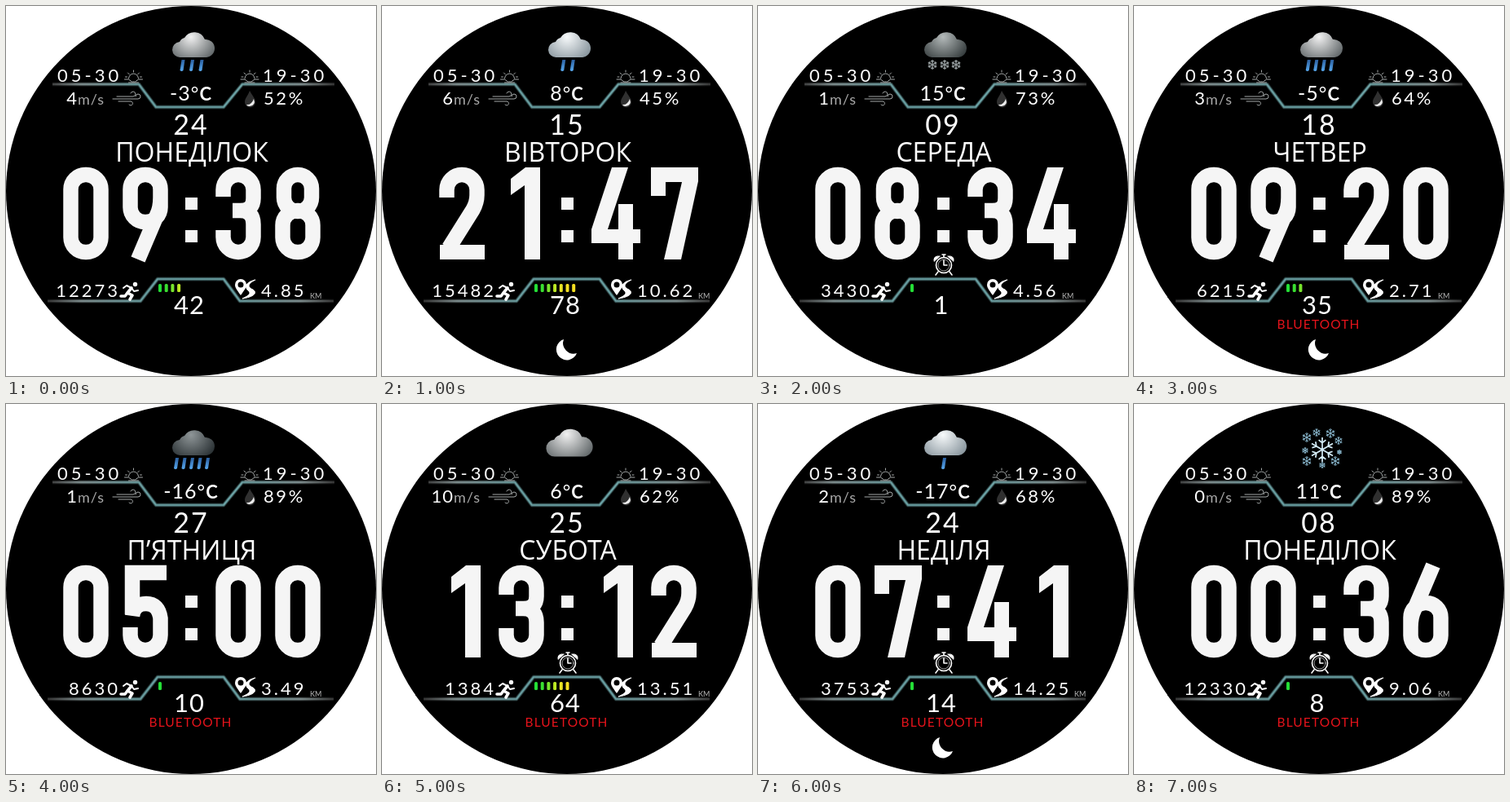
An HTML page for the animation above (8 s loop, 454x454 px).

```html
<!DOCTYPE html>
<html lang="uk">
<head>
<meta charset="utf-8">
<title>Watch face</title>
<style>
html, body { margin: 0; width: 100%; height: 100%; overflow: hidden; background: #fff; }
svg { display: block; width: 454px; height: 454px; }
text { font-family: Lato, "Open Sans", sans-serif; fill: #fff; }
.time { font-size: 22px; letter-spacing: 4px; }
.num { font-size: 22px; letter-spacing: 3px; }
.end { text-anchor: end; }
.mid { text-anchor: middle; }
.line { fill: none; stroke: #fff; stroke-linecap: round; stroke-linejoin: round; }
.gray { stroke: #a4a8a8; stroke-width: 1; }
</style>
</head>
<body>
<svg viewBox="0 0 454 454">
  <defs>
    <linearGradient id="rail" gradientUnits="userSpaceOnUse" x1="50" y1="0" x2="404" y2="0">
      <stop offset="0" stop-color="#777" stop-opacity=".35"/>
      <stop offset=".12" stop-color="#8b9c9d"/>
      <stop offset=".35" stop-color="#6fa9ac"/>
      <stop offset=".65" stop-color="#6fa9ac"/>
      <stop offset=".88" stop-color="#8b9c9d"/>
      <stop offset="1" stop-color="#777" stop-opacity=".35"/>
    </linearGradient>
    <radialGradient id="sky" gradientUnits="userSpaceOnUse" cx="227" cy="37" r="34">
      <stop id="lit" offset="0"/>
      <stop id="shade" offset="1"/>
    </radialGradient>
    <linearGradient id="rain" x1="0" y1="0" x2="0" y2="1">
      <stop offset="0" stop-color="#2b5fa0"/>
      <stop offset="1" stop-color="#58a9ee"/>
    </linearGradient>
  </defs>

  <circle cx="227" cy="227" r="227"/>

  <g id="rails" fill="none" stroke-linejoin="round"></g>
  <g id="weather"></g>

  <text class="time" x="63" y="93">05-30</text>
  <text class="time" x="315" y="93">19-30</text>
  <g id="suns" class="line gray"></g>

  <text id="wind" class="end" x="88" y="121" font-size="22" letter-spacing="1"></text>
  <text x="88" y="121" font-size="18" letter-spacing="1" style="fill:#a9a9a9">m/s</text>
  <path class="line gray" d="M136 111H156a3 3 0 1 0-3-4M131 114H162a3 3 0 1 0-3-3M138 117H153a2.5 2.5 0 1 1-2 4"/>
  <path d="M299 104C302 110 306 113 306 118A6.5 6.5 0 0 1 293 118C293 113 297 110 299 104Z" fill="#303030"/>
  <path d="M304 114q3 8-5 9-3 0-4-2 6 1 9-7Z" fill="#eee"/>
  <text id="humid" x="316" y="121" font-size="22" letter-spacing="2.6"></text>

  <text class="mid" x="227" y="116" font-size="25" letter-spacing="1"><tspan id="temp"></tspan><tspan font-size="23">°</tspan><tspan font-size="22" font-weight="700">C</tspan></text>

  <text id="date" class="mid" x="227" y="158" font-size="34" letter-spacing="2"></text>
  <text id="day" class="mid" x="228" y="191" font-size="32" style="font-family:'Open Sans','Noto Sans',sans-serif"></text>

  <g id="clock"></g>
  <path d="M220 235h15v15h-15ZM220 275h15v15h-15Z" fill="#f5f5f5"/>

  <g id="alarm" class="line" stroke-width="1.6">
    <circle cx="228" cy="318" r="9.5"/>
    <circle cx="228" cy="318" r="7" stroke-width=".6"/>
    <path d="M228 312V318H232M221 326L218 330M235 326L238 330M226 305H230M228 305V308"/>
    <path d="M216 313Q215 306 223 307ZM240 313Q241 306 233 307Z" fill="#fff" stroke-width="1"/>
  </g>

  <text id="steps" class="num end" x="140" y="357"></text>
  <g class="line" stroke-width="3.2">
    <circle cx="158.500" cy="341.500" r="1.700" fill="#fff" stroke-width="2"/>
    <path d="M154 346L149 352L155 355L152 360M149 352L146 356H141" stroke-width="3.6"/>
    <path d="M154 346L148 343L144 346M154 346L157 350L162 349" stroke-width="2"/>
  </g>

  <g id="bars"></g>
  <text id="power" class="mid" x="225" y="378" font-size="31" letter-spacing="1"></text>

  <path d="M288 355C284 349 281 346 281 342A7 7 0 0 1 295 342C295 346 292 349 288 355ZM288 338.500A3.500 3.500 0 1 0 288 345.500A3.500 3.500 0 1 0 288 338.500Z" fill="#fff" fill-rule="evenodd"/>
  <path d="M306 336C296 341 296 345 303 348C309 352 304 357 290 359C299 355 301 352 297 349C291 343 297 338 306 336Z" fill="#fff" stroke="#fff"/>
  <text id="dist" class="num" x="313" y="357"></text>
  <text id="unit" y="359" font-size="9" style="fill:#bbb">КМ</text>

  <text id="link" class="mid" x="226.500" y="396" font-size="15.500" letter-spacing="1.100" style="fill:#e5131b">BLUETOOTH</text>
  <path id="moon" d="M223 409A13 13 0 1 0 239 426A13 13 0 0 1 223 409Z" fill="#fff"/>
</svg>

<script>
const $ = id => document.getElementById(id);

const ring = (x, y, w, h, r) =>
  `M${x + r} ${y}h${w - 2 * r}a${r} ${r} 0 0 1 ${r} ${r}v${h - 2 * r}a${r} ${r} 0 0 1 ${-r} ${r}` +
  `h${2 * r - w}a${r} ${r} 0 0 1 ${-r} ${-r}v${2 * r - h}a${r} ${r} 0 0 1 ${r} ${-r}Z`;
const stroked = d => `<path d="${d}" fill="none" stroke="#f5f5f5" stroke-width="18.5"/>`;
const solid = d => `<path d="${d}" fill="#f5f5f5"/>`;

// Digit shapes in a 56 x 113 cell
const six = stroked(ring(9.5, 46, 37, 58, 18) + 'M37 0L14 54Q9.5 63 9.5 76');
const digits = [
  stroked(ring(9.5, 9, 37, 95, 18)),
  solid('M51 0H33L15 14V34L32 22V113H51Z'),
  stroked('M9.5 37V27.5a18.5 18.5 0 0 1 37 0V34q0 9-5 18L12 99') + solid('M1 95H56V113H1Z'),
  stroked('M9.5 36V27.5a18.5 18.5 0 0 1 37 0V38q0 15-16 15H21M30 53q16.5 0 16.5 17V85.500a18.5 18.5 0 0 1-37 0V77'),
  solid('M25 0H45L20 76H33V45H51V76H60V93H51V113H33V93H0V76Z'),
  stroked('M54 9H12V60M12 62q2-15 17-15t17.500 18V85.500a18.5 18.5 0 0 1-37 0V76'),
  six,
  solid('M0 0H58V17L37 113H16L38 18H18V35H0Z'),
  stroked(ring(11, 9, 34, 45, 17) + ring(9.5, 53, 37, 51, 18)),
  `<g transform="rotate(180 28 56.5)">${six}</g>`
];
const slots = [70, 143, 257, 330];

const flake = (x, y, r, color, w) => {
  let d = '';
  for (let i = 0; i < 6; i++) {
    const a = Math.PI / 6 + i * Math.PI / 3;
    const at = (k, turn) => `${x + r * k * Math.cos(a + turn)} ${y + r * k * Math.sin(a + turn)}`;
    d += `M${x} ${y}L${at(1, 0)}M${at(.85, .35)}L${at(.55, 0)}L${at(.85, -.35)}`;
  }
  return `<path d="${d}" fill="none" stroke="${color}" stroke-width="${w}"/>`;
};

const tones = {
  white: ['#f7fafb', '#87949c'],
  pale: ['#f1f1f1', '#606668'],
  dim: ['#b4baba', '#343b3c'],
  dark: ['#8f9698', '#293033']
};
const cloudShape = '<path fill="url(#sky)" d="M214 62A9.500 9.500 0 0 1 213 43A9 9 0 0 1 219 38A14 14 0 0 1 244 40A11 11 0 0 1 246 62Z"/>';
const cloud = scale => `<g transform="translate(230 47) scale(${scale}) translate(-230 -46)">${cloudShape}</g>`;
const drops = (n, mid, gap) => Array.from({ length: n }, (_, i) => {
  const x = mid + (i - (n - 1) / 2) * gap;
  return `<path fill="url(#rain)" d="M${x - 1} 66h4l-2 13q-2 2-4 0Z"/>`;
}).join('');

const skies = {
  rain: n => cloud(1) + drops(n, 228, n > 3 ? 9.5 : 11.5),
  snow: () => cloud(1) + [214, 229, 243].map(x => flake(x, 72, 6, '#92999b', 1.3)).join(''),
  cloudy: () => cloud(1.1),
  frost: () => flake(231, 56, 15, '#d5edf8', 1.7) +
    [[212, 41, 6], [224, 35, 5], [241, 36, 6], [251, 45, 5], [210, 57, 4], [212, 70, 6], [247, 70, 6], [231, 75, 4], [252, 59, 3]]
      .map(([x, y, r]) => flake(x, y, r, '#8fbfd6', 1)).join('')
};

// day, date, time, temp, wind, humidity, steps, distance, power, sky, drops, tone, alarm, link, moon
const keys = 'day date time temp wind humid steps dist power sky n tone alarm link moon'.split(' ');
const scenes = [
  'ПОНЕДІЛОК 24 0938 -3 4 52 12273 4.85 42 rain 3 pale 0 0 0',
  'ВІВТОРОК 15 2147 8 6 45 15482 10.62 78 rain 2 white 0 0 1',
  'СЕРЕДА 09 0834 15 1 73 3430 4.56 1 snow 0 dim 1 0 0',
  'ЧЕТВЕР 18 0920 -5 3 64 6215 2.71 35 rain 4 pale 0 1 1',
  'П’ЯТНИЦЯ 27 0500 -16 1 89 8630 3.49 10 rain 5 dark 0 1 0',
  'СУБОТА 25 1312 6 10 62 1384 13.51 64 cloudy 0 pale 1 1 0',
  'НЕДІЛЯ 24 0741 -17 2 68 3753 14.25 14 rain 1 white 1 1 1',
  'ПОНЕДІЛОК 08 0036 11 0 89 12330 9.06 8 frost 0 pale 1 1 0'
].map(row => Object.fromEntries(row.split(' ').map((v, i) => [keys[i], v])));

const barColors = ['#24df36', '#39df30', '#78e52c', '#bce824', '#e8e323', '#f4df22'];

$('rails').innerHTML = ['M57 96H163L184 124H267L290 96H403', 'M51 362H165L186 335H267L287 362H402']
  .map(d => [[5, .25], [3, .65], [1.2, 1]]
    .map(([w, o]) => `<path d="${d}" stroke="url(#rail)" stroke-width="${w}" opacity="${o}"/>`).join('')).join('');

$('suns').innerHTML = [156.5, 299].map(x =>
  `<path transform="translate(${x} 88)" d="M-6 1A6 6 0 0 1 6 1M-11 2H-6L-2 5H2L6 2H11M0-9V-7M-7-6L-5-4M7-6L5-4M-10-1H-8M10-1H8M-6 6H6"/>`).join('');

let shown = -1;

function draw(ms) {
  const i = Math.floor(ms % 8000 / 1000);
  if (i === shown) return;
  shown = i;
  const s = scenes[i];
  for (const k of ['day', 'date', 'temp', 'wind', 'steps', 'dist', 'power']) $(k).textContent = s[k];
  $('humid').textContent = s.humid + '%';
  $('unit').setAttribute('x', s.dist.length > 4 ? 388 : 373);
  for (const k of ['alarm', 'link', 'moon']) $(k).style.display = s[k] === '1' ? '' : 'none';
  $('clock').innerHTML = [...s.time].map((c, j) =>
    `<g transform="translate(${slots[j]} 198)">${digits[c]}</g>`).join('');
  const count = Math.max(1, Math.floor(s.power / 10));
  $('bars').innerHTML = Array.from({ length: count }, (_, j) =>
    `<rect x="${187 + j * 7.7}" y="341" width="4" height="10" rx="1.5" fill="${barColors[Math.min(j, 5)]}"/>`).join('');
  const [lit, shade] = tones[s.tone];
  $('lit').setAttribute('stop-color', lit);
  $('shade').setAttribute('stop-color', shade);
  $('weather').innerHTML = skies[s.sky](+s.n);
}

const start = performance.now();
function tick() {
  draw(performance.now() - start);
  requestAnimationFrame(tick);
}
draw(0);
requestAnimationFrame(tick);
</script>
</body>
</html>
```
